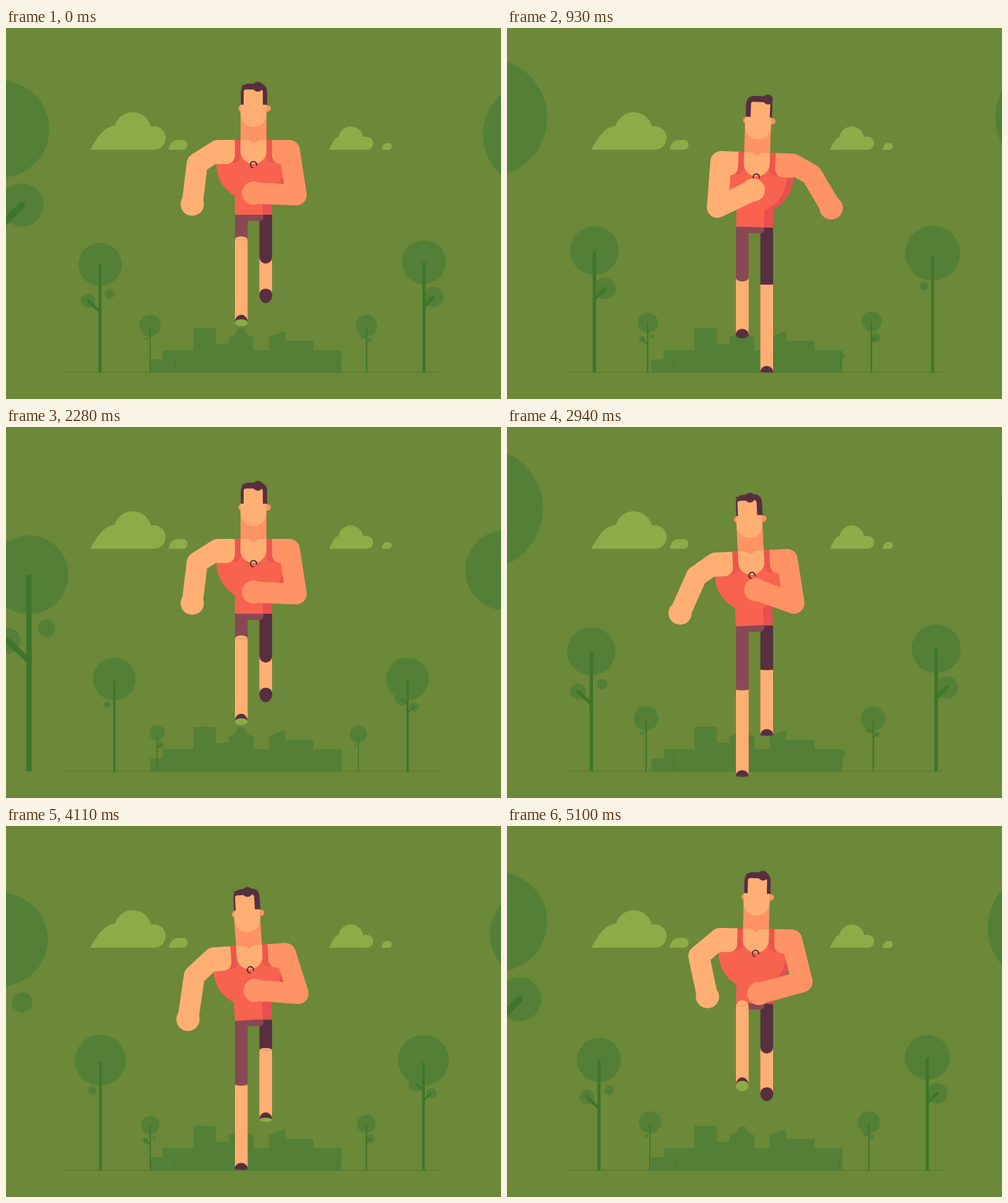
Recreate the animation shown at these times as an HTML page with a canvas. Size 800 by 600 pixels, loop 5130 ms.

```html
<!DOCTYPE html>
<html lang="en">
<head>
<meta charset="utf-8">
<title>Runner in the park</title>
<style>
  html, body { margin: 0; width: 100%; height: 100%; overflow: hidden; background: #6c8839; }
  canvas { display: block; }
</style>
</head>
<body>
<canvas id="stage" width="800" height="600"></canvas>
<script>
const ctx = document.getElementById('stage').getContext('2d');
const LOOP = 5130, STEP = 30, CYCLE = 19, GROUND = 557;
const GRASS = '#6c8839', LEAF = '#538036', TRUNK = '#3e752c', CLOUD = '#8cac48';
const SKIN = '#ffaf73', SHADE = '#ff9366', SHIRT = '#f7634f', STRAP = '#ec564c', SHIRT_DARK = '#e94f50';
const DARK = '#572f3f', SHORTS = '#884955';

const fill = (d, color) => { ctx.fillStyle = color; ctx.fill(new Path2D(d)); };
const box = (x, y, w, h, color) => { ctx.fillStyle = color; ctx.fillRect(x, y, w, h); };
function oval(x, y, rx, ry, color, from = 0, to = 2 * Math.PI) {
  ctx.fillStyle = color;
  ctx.beginPath();
  ctx.ellipse(x, y, rx, ry, 0, from, to);
  ctx.fill();
}
function line(points, width, color) {
  ctx.strokeStyle = color;
  ctx.lineWidth = width;
  ctx.lineCap = ctx.lineJoin = 'round';
  ctx.beginPath();
  points.forEach(p => ctx.lineTo(...p));
  ctx.stroke();
}
function group(draw) { ctx.save(); draw(); ctx.restore(); }

// ---- scenery ----
const CITY = 'M233 557V536H253V521H303V485H339V511H360V500Q371 498 373 490L375 486H385L387 490' +
  'Q389 498 400 500V521H425V500L451 490V506H497V521H542V557Z';
const CLOUDS = 'M136 197C147 178 157 160 176 158A30 30 0 0 1 234 159H239A19 19 0 0 1 239 197Z' +
  'M263 197C264 187 270 181 279 181H285.5A8 8 0 0 1 285.5 197Z' +
  'M522 197C527 186 531 178 537.5 176A20 20 0 0 1 577 176H583A10.4 10.4 0 0 1 583 197Z' +
  'M607 197C608 190 611 186 616 186H618A5.4 5.4 0 0 1 618 197Z';

// balls: x, height, radius, height where the branch leaves the trunk (0 = none)
const TREES = {
  A: { h: 174.5, r: 35, top: 174.5, w: 4.9, branch: 5, balls: [[-19, 116, 11.5, 98], [15.6, 127, 7.7, 0]] },
  B: { h: 183, r: 36.5, top: 182, w: 5.1, branch: 5, balls: [[16, 126, 16.2, 110]] },
  C: { h: 179, r: 41.3, top: 175.5, w: 4.3, branch: 3, balls: [[-13, 129.5, 6.7, 0]] },
  D: { h: 179, r: 41.3, top: 175.5, w: 4.3, branch: 2.7, balls: [[-11.8, 140.5, 12.5, 130], [12.5, 125.3, 8.6, 114]] },
  E: { h: 178.5, r: 35.6, top: 178, w: 5, branch: 5, balls: [[15.6, 122, 16.3, 106.5]] }
};
const ROWS = [
  { side: -1, near: 162.5, far: 85.5, kinds: 'ABCAC' },
  { side: 1, near: 186.5, far: 89, kinds: 'ECDED' }
];

function tree(kind, x, s) {
  const k = TREES[kind];
  group(() => {
    ctx.translate(x, GROUND);
    ctx.scale(s, s);
    oval(0, -k.h, k.r, k.r, LEAF);
    for (const [bx, by, r] of k.balls) oval(bx, -by, r, r, LEAF);
    box(-k.w / 2, -k.top, k.w, k.top, TRUNK);
    for (const [bx, by, , root] of k.balls)
      if (root) line([[0, -root], [bx, -by]], k.branch, TRUNK);
  });
}

// Each tree recedes exponentially; five per side share the loop evenly.
function trees(t) {
  for (const row of ROWS) {
    [...row.kinds].map((kind, i) => {
      const age = (t - i * LOOP / 5 + 1900 + 2 * LOOP) % LOOP - 1900;
      return { kind, u: Math.exp(-0.00067 * age) };
    }).sort((a, b) => a.u - b.u).forEach(({ kind, u }) => {
      const s = (u - 0.14) / 0.86;
      if (s > 0) tree(kind, 400 + row.side * (row.far + row.near * u), s);
    });
  }
}

// ---- runner ----
const KEYS = [0, 2, 5, 6, 8, 10, 12, 15, 16, 18], SPAN = 20;
const both = (half, sign) => half.concat(half.map(v => v * sign));
const POSE = {
  lift: both([0, 20, 0, -14.5, -15], 1),
  tilt: both([0, -2, -3.6, -3, -1.2], -1),
  turn: both([-2, -5.5, -6, -6, -0.5], -1),
  elbowX: [309, 308, 305, 309, 323, 331, 340, 320, 314, 310],
  elbowY: [219, 217, 241, 252, 267, 270, 270, 251, 241, 225],
  handX: [301, 276, 317, 348, 393, 400, 398, 390, 374, 324],
  handY: [285, 271, 314, 315, 286, 267, 242, 267, 280, 291],
  knee: [337, 395, 405, 398, 383, 381, 390, 318, 289, 297],
  foot: [482, 537, 532, 508, 460, 445, 482, 450, 432, 444],
  pitch: [5.5, 0, -4, -7, -13, -14, -6, 7, 9, 8.5]
};

// Smooth periodic curve through the key poses.
function curve(v, n) {
  const count = KEYS.length;
  const at = i => v[(i + count) % count];
  const time = i => KEYS[(i + count) % count] + SPAN * Math.floor(i / count);
  const gap = i => time(i + 1) - time(i);
  const rate = i => (at(i + 1) - at(i)) / gap(i);
  const slope = i => (rate(i - 1) * gap(i) + rate(i) * gap(i - 1)) / (gap(i) + gap(i - 1));
  let i = count - 1;
  while (KEYS[i] > n) i--;
  const h = gap(i), p = (n - KEYS[i]) / h, q = 1 - p;
  return at(i) * q * q * (1 + 2 * p) + at(i + 1) * p * p * (1 + 2 * q) +
    h * p * q * (slope(i) * q - slope(i + 1) * p);
}
function pose(n) {
  const out = {};
  for (const name in POSE) out[name] = curve(POSE[name], n % SPAN);
  return out;
}

function shin(p, top) {
  const mid = p.foot - Math.abs(p.pitch);
  box(370, top, 20.5, mid - top, SKIN);
  oval(380.2, mid, 10.5, p.pitch < 0 ? 9.5 : 10.5 + 0.4 * p.pitch, DARK, Math.PI, 2 * Math.PI);
  if (p.pitch < 0) oval(380.2, mid, 10.5, -p.pitch, DARK, 0, Math.PI);
  else oval(380.2, mid, 10.5, p.pitch, CLOUD);
}
function backLeg(p, color) {
  const round = Math.min(10, Math.abs(p.pitch));
  if (p.pitch >= 0) {
    box(370, 302, 20.5, Math.max(0, p.knee + round - 302), color);
    return;
  }
  shin(p, p.knee - round);
  box(370, 302, 20.5, p.knee - round - 302, color);
  oval(380.2, p.knee - round, 10.2, round, color, 0, Math.PI);
}
function frontLeg(p) {
  if (p.pitch < 0) return;
  const round = Math.min(10, p.pitch);
  oval(380.2, p.knee + round, 10.2, round, SKIN, Math.PI, 2 * Math.PI);
  shin(p, p.knee + round);
}
function arm(p, color) {
  const a = p.tilt * Math.PI / 180, c = Math.cos(a), s = Math.sin(a);
  const shoulder = [400 - 58 * c + 104 * s, 302 - 58 * s - 104 * c];
  line([shoulder, [p.elbowX, p.elbowY], [p.handX, p.handY]], 34, color);
  oval(p.handX, p.handY, 18.8, 18.8, color);
}

function torso(p) {
  ctx.translate(400, 302);
  ctx.rotate(p.tilt * Math.PI / 180);
  ctx.translate(-400, -302);

  fill('M440 220H460A60 60 0 0 1 430 272V302H410V260Z', SHIRT_DARK);
  fill('M370 181H430V200H444V220H450A60 60 0 0 1 415 274.5V302H370V272A60 60 0 0 1 340 220H356V200H370Z', SHIRT);
  fill('M370 181H379V212Q376 218 366 218Q370 213 370 206ZM421 181H430V206Q430 213 434 218Q424 218 421 212Z', STRAP);
  fill('M340 181H370V206A14 14 0 0 1 356 220H340Z', SKIN);
  fill('M460 181H430V206A14 14 0 0 0 444 220H460Z', SHADE);
  fill('M379 181H421V199A21 21 0 0 1 379 199Z', SKIN);
  fill('M379 130H421V181H416Q405 181 400 187Q395 181 384 181H379Z', SHADE);

  ctx.strokeStyle = DARK;
  ctx.lineWidth = 2.2;
  ctx.lineCap = 'butt';
  ctx.beginPath();
  ctx.arc(400, 221, 5, 1.6, 6.6);
  ctx.stroke();

  // head
  const bump = 409 + p.turn, open = 384.5 + p.turn / 2.2 + 0.5;
  oval(380.5, 130, 5, 5.2, SHADE);
  oval(423, 130, 5, 5.2, SHADE);
  fill('M379.5 124V104Q380 92 390 90H412Q422 92 422 104V125H379.5Z', DARK);
  fill('M379 124H421V139A21 21 0 0 1 379 139Z', SKIN);
  ctx.fillStyle = SKIN;
  ctx.beginPath();
  ctx.roundRect(open, 99.5, 31, 30, 4);
  ctx.fill();
  oval(bump, 95, 8, 8, DARK);
  const curl = 382 + (p.turn + 2) * 0.3;
  line([[curl, 93], [curl + 2, 95.5], [curl + 6, 96.5]], 2, DARK);
}

function runner(n) {
  const left = pose(n), right = pose(n + SPAN / 2);
  const mirrored = draw => group(() => {
    ctx.translate(800, 0);
    ctx.scale(-1, 1);
    draw();
  });
  group(() => {
    ctx.translate(0, left.lift);
    backLeg(left, SHORTS);
    mirrored(() => backLeg(right, DARK));
    fill('M370 300H416V306Q415 312 409 312H370Z', SHORTS);
    group(() => torso(left));
    arm(left, SKIN);
    mirrored(() => arm(right, SHADE));
    frontLeg(left);
    mirrored(() => frontLeg(right));
  });
}

function draw(now) {
  const step = Math.floor(now % LOOP / STEP);
  box(0, 0, 800, 600, GRASS);
  fill(CLOUDS, CLOUD);
  fill(CITY, LEAF);
  box(96, 556.5, 608, 1, '#4f7a33');
  trees(step * STEP);
  runner(step % CYCLE);
}

const start = performance.now();
function tick() {
  draw(performance.now() - start);
  requestAnimationFrame(tick);
}
tick();
</script>
</body>
</html>
```
